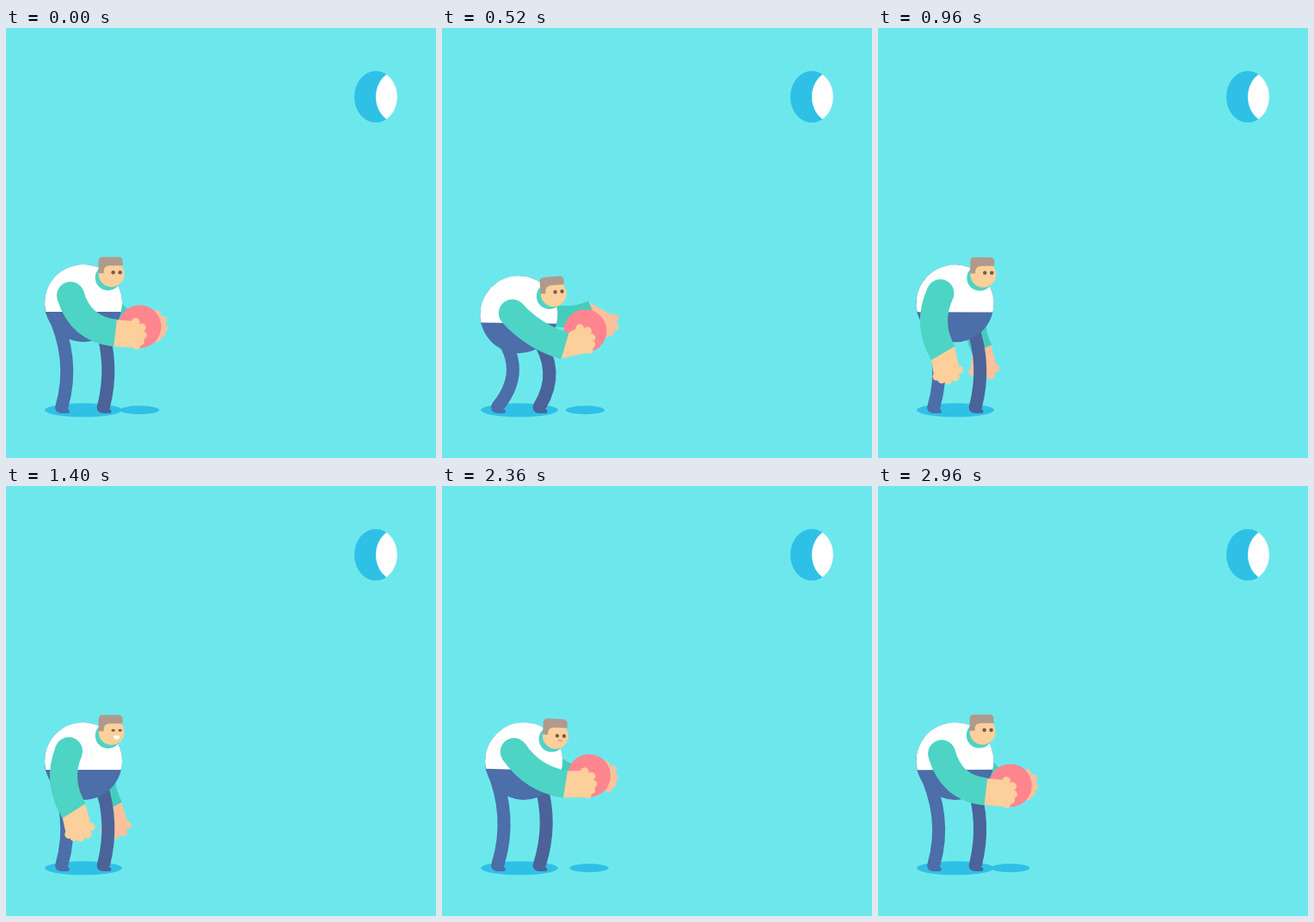
Animation, 500 px wide and 500 px high, one loop 3 s. Source, as an HTML page with a canvas:

```html
<!DOCTYPE html>
<html>
<head>
<meta charset="utf-8">
<style>
html, body { margin: 0; width: 100%; height: 100%; overflow: hidden; background: #6ce8ed; }
canvas { display: block; width: 500px; height: 500px; }
</style>
</head>
<body>
<canvas id="stage" width="500" height="500"></canvas>
<script>
const ctx = document.getElementById('stage').getContext('2d');
const LOOP = 3000, RELEASE = 560, CATCH = 2140;
const ARM = 73;
const C = {
  bg: '#6ce8ed', shade: '#2fc0e6', white: '#ffffff', pants: '#4c6ea9', pantsDark: '#4b6399',
  sleeve: '#4dd4c5', sleeveDark: '#44cdbd', skin: '#fdcf9b', skinDark: '#fcc19a',
  ball: '#ff858f', hair: '#b09a8c', eye: '#705c50', lip: '#f2a583'
};

// body: x, y, tilt; head: angle around the body, nod; shoulder: offset from the body;
// front and back arm: reach, direction, hand direction
const poses = {
  rest: { body: [90, 320, 0], head: [-46, 0], shoulder: [-15, -9], front: [68, 40, 3], back: [45, 40, 3] },
  crouch: { body: [73, 354, 7.6], head: [-14, 0], shoulder: [-3, 5], front: [69, 75, 8], back: [45, 24, 130] },
  toss: { body: [113, 303, -9], head: [-55, -11], shoulder: [-14, -11], front: [76.6, -30, -58], back: [78.6, -38.5, -66] },
  idle: { body: [90, 320, 0], head: [-46, 0], shoulder: [-17, -12], front: [70, 85, 75], back: [57, 83, 82] },
  ready: { body: [90, 315, 0], head: [-46, 0], shoulder: [-17, -11], front: [54, 94, 8], back: [50, 90, 4] },
  grab: { body: [116, 320, 8], head: [-8, 15], shoulder: [3, -19], front: [82, 2, -25], back: [74, -34, -27] }
};

const rad = deg => deg * Math.PI / 180;
const lerp = (a, b, u) => a + (b - a) * u;
const ramp = (t, from, to) => {
  const u = Math.min(1, Math.max(0, (t - from) / (to - from)));
  return u * u * (3 - 2 * u);
};
const spring = (s, decay, speed) => Math.exp(-decay * s) * Math.cos(rad(speed * s));

function turn(x, y, deg) {
  const c = Math.cos(rad(deg)), s = Math.sin(rad(deg));
  return [x * c - y * s, x * s + y * c];
}

function mix(a, b, u) {
  const out = {};
  for (const part in a) out[part] = a[part].map((v, i) => lerp(v, b[part][i], u));
  return out;
}

function poseAt(t) {
  const { rest, crouch, toss, idle, ready, grab } = poses;
  if (t < 420) return mix(rest, crouch, ramp(t, 0, 420));
  if (t < 720) return mix(crouch, toss, ramp(t, 420, 650));
  if (t < 1720) return mix(idle, toss, spring(t - 720, 0.007, 0.4));
  if (t < 1960) return mix(idle, ready, ramp(t, 1720, 1960));
  if (t < CATCH) return mix(ready, grab, ramp(t, 1960, CATCH));
  return mix(rest, grab, spring(t - CATCH, 0.0045, 0.26));
}

function frontWrist(p) {
  const [dx, dy] = turn(p.front[0], 0, p.front[1]);
  return [p.body[0] + p.shoulder[0] + dx, p.body[1] + p.shoulder[1] + dy];
}

function heldBall(p) {
  const [wx, wy] = frontWrist(p), [dx, dy] = turn(28, -9, p.front[2]);
  return { x: wx + dx, y: wy + dy, shade: 1 };
}

// u runs from the hands (0) to the top of the arc (1)
function flight(hand, topX, topY, u, shade) {
  return { x: lerp(hand.x, topX, u), y: lerp(topY, hand.y, (1 - u) ** 2), shade: Math.max(0, shade) };
}

function ballAt(t, pose) {
  if (t < RELEASE || t >= CATCH) return heldBall(pose);
  if (t < 1000) {
    const u = (t - RELEASE) / 310;
    return flight(heldBall(poseAt(RELEASE)), 446.5, 81, u, 1 - u);
  }
  if (t < 1700) return null;
  const u = (CATCH - t) / 450;
  return flight(heldBall(poses.grab), 491, 80, u, 1 - u ** 1.5);
}

function oval(x, y, rx, ry, color) {
  ctx.fillStyle = color;
  ctx.beginPath();
  ctx.ellipse(x, y, rx, ry, 0, 0, 7);
  ctx.fill();
}
const disc = (x, y, r, color) => oval(x, y, r, r, color);

function arc(x, y, rx, ry, from, to, color) {
  ctx.fillStyle = color;
  ctx.beginPath();
  ctx.ellipse(x, y, rx, ry, 0, from, to);
  ctx.fill();
}

function curve(x0, y0, cx, cy, x1, y1, width, color, cap) {
  ctx.strokeStyle = color;
  ctx.lineWidth = width;
  ctx.lineCap = cap;
  ctx.beginPath();
  ctx.moveTo(x0, y0);
  ctx.quadraticCurveTo(cx, cy, x1, y1);
  ctx.stroke();
}

function drawHole() {
  oval(430, 80, 25, 30, C.shade);
  ctx.save();
  ctx.beginPath();
  ctx.ellipse(430, 80, 25, 30, 0, 0, 7);
  ctx.clip();
  oval(455, 80, 25, 30, C.white);
  ctx.restore();
}

function drawHand(wx, wy, half, cuff, angle, color) {
  const at = (x, y, deg) => { const p = turn(x, y, deg); return [wx + p[0], wy + p[1]]; };
  const tips = [[23, -14], [30.5, -8], [32, 1], [29.5, 8], [25, 13]].map(f => at(...f, angle));
  ctx.fillStyle = color;
  ctx.beginPath();
  [at(-1, -half, cuff), at(20, -15, angle), ...tips, at(24, 16, angle), at(-1, half, cuff)]
    .forEach(p => ctx.lineTo(...p));
  ctx.fill();
  tips.forEach(p => disc(...p, 4.8, color));
}

function drawArm(sx, sy, [reach, dir, hand], sag, width, sleeve, skin) {
  const [wx, wy] = turn(reach, 0, dir), [cx, cy] = turn(reach / 2, 2 * sag, dir);
  const cuff = Math.atan2(wy - cy, wx - cx) * 180 / Math.PI;
  drawHand(sx + wx, sy + wy, width / 2 - 0.5, cuff, hand, skin);
  curve(sx, sy, sx + cx, sy + cy, sx + wx, sy + wy, width, sleeve, 'butt');
  disc(sx, sy, width / 2, sleeve);
}

function drawLeg(hx, hy, fx, bend, color) {
  curve(hx, hy, (hx + fx) / 2 + 2 * bend, (hy + 440) / 2, fx, 440, 15, color, 'round');
  ctx.fillStyle = color;
  ctx.beginPath();
  ctx.moveTo(fx - 8, 440);
  ctx.quadraticCurveTo(fx - 8, 448, fx, 448);
  ctx.lineTo(fx + 6, 448);
  ctx.quadraticCurveTo(fx + 9, 448, fx + 9, 445.5);
  ctx.quadraticCurveTo(fx + 8.5, 443, fx + 5, 443);
  ctx.lineTo(fx + 7, 438);
  ctx.fill();
}

// Knees bend more as the hips come closer to the feet
function drawLegs(x, y, tilt) {
  const far = turn(20, 25, tilt), near = turn(-37, 8, tilt);
  const fx = x + far[0], fy = y + far[1], nx = x + near[0], ny = y + near[1];
  const farGap = 95 - Math.hypot(113 - fx, 440 - fy);
  const nearGap = 112.6 - Math.hypot(65 - nx, 440 - ny);
  drawLeg(fx, fy, 113.5, Math.max(3, 7 + farGap / 2), C.pantsDark);
  drawLeg(nx, ny, 65, Math.max(5, 11 + nearGap), C.pants);
}

function drawBody(x, y, tilt) {
  const belt = Math.asin(10 / 45);
  ctx.save();
  ctx.translate(x, y);
  ctx.rotate(rad(tilt));
  disc(0, 0, 45, C.pants);
  arc(0, 0, 45, 45, Math.PI - belt, 2 * Math.PI + belt, C.white);
  ctx.restore();
}

function drawHead(x, y, nod, smile, frown) {
  const eyeY = -2 + 2 * frown, eyeH = 2.2 - 0.8 * smile;
  ctx.save();
  ctx.translate(x, y);
  ctx.rotate(rad(nod));
  disc(0, 0, 15, C.skin);
  ctx.fillStyle = C.hair;
  ctx.beginPath();
  ctx.moveTo(-15, -1);
  ctx.lineTo(-15, -15);
  ctx.quadraticCurveTo(-15, -20, -10, -20);
  ctx.lineTo(8, -20);
  ctx.quadraticCurveTo(13, -20, 13, -15);
  ctx.lineTo(13, -10);
  ctx.lineTo(-2, -10);
  ctx.quadraticCurveTo(-9, -10, -9, -3);
  ctx.lineTo(-9, -1);
  ctx.fill();
  oval(2, eyeY, 2.2, eyeH, C.eye);
  oval(10, eyeY, 2.2, eyeH, C.eye);
  arc(6, 4, 3.5, 4.5 * smile, 0, Math.PI, C.white);
  arc(5.5, 6, 3.2, 3.5 * frown, Math.PI, 2 * Math.PI, C.lip);
  ctx.restore();
}

// Past the middle of the hole the ball shows only inside its rim
function drawBall(ball) {
  ctx.save();
  ctx.beginPath();
  ctx.rect(0, 0, 430, 500);
  ctx.ellipse(430, 80, 25, 30, 0, -Math.PI / 2, Math.PI / 2);
  ctx.clip();
  disc(ball.x, ball.y, 25, C.ball);
  ctx.restore();
}

function draw(t) {
  const pose = poseAt(t), ball = ballAt(t, pose);
  const [x, y, tilt] = pose.body;
  const reach = pose.front[0];
  const far = turn(27, -3, tilt);
  const head = turn(47, 0, pose.head[0]);
  const smile = ramp(t, 1000, 1120) - ramp(t, 1720, 1800);
  const frown = ramp(t, 1800, 1880) - ramp(t, 2300, 2480);
  const sag = Math.max(5, Math.sqrt(Math.max(0, 0.375 * reach * (ARM - reach))));

  ctx.fillStyle = C.bg;
  ctx.fillRect(0, 0, 500, 500);
  drawHole();
  oval(90, 444.3, 45, 8, C.shade);
  if (ball) oval(ball.x, 444.3, 22.5 * ball.shade, 5 * ball.shade, C.shade);

  drawArm(x + far[0], y + far[1], pose.back, pose.back[0] * 0.1, 25, C.sleeveDark, C.skinDark);
  drawLegs(x, y, tilt);
  drawBody(x, y, tilt);
  disc(x + head[0] * 0.88, y + head[1] * 0.88, 15, C.sleeve);
  drawHead(x + head[0], y + head[1], pose.head[1], smile, frown);
  if (ball) drawBall(ball);
  drawArm(x + pose.shoulder[0], y + pose.shoulder[1], pose.front, sag, 32, C.sleeve, C.skin);
}

const start = performance.now();
function tick() {
  draw((performance.now() - start) % LOOP);
  requestAnimationFrame(tick);
}
tick();
</script>
</body>
</html>
```
